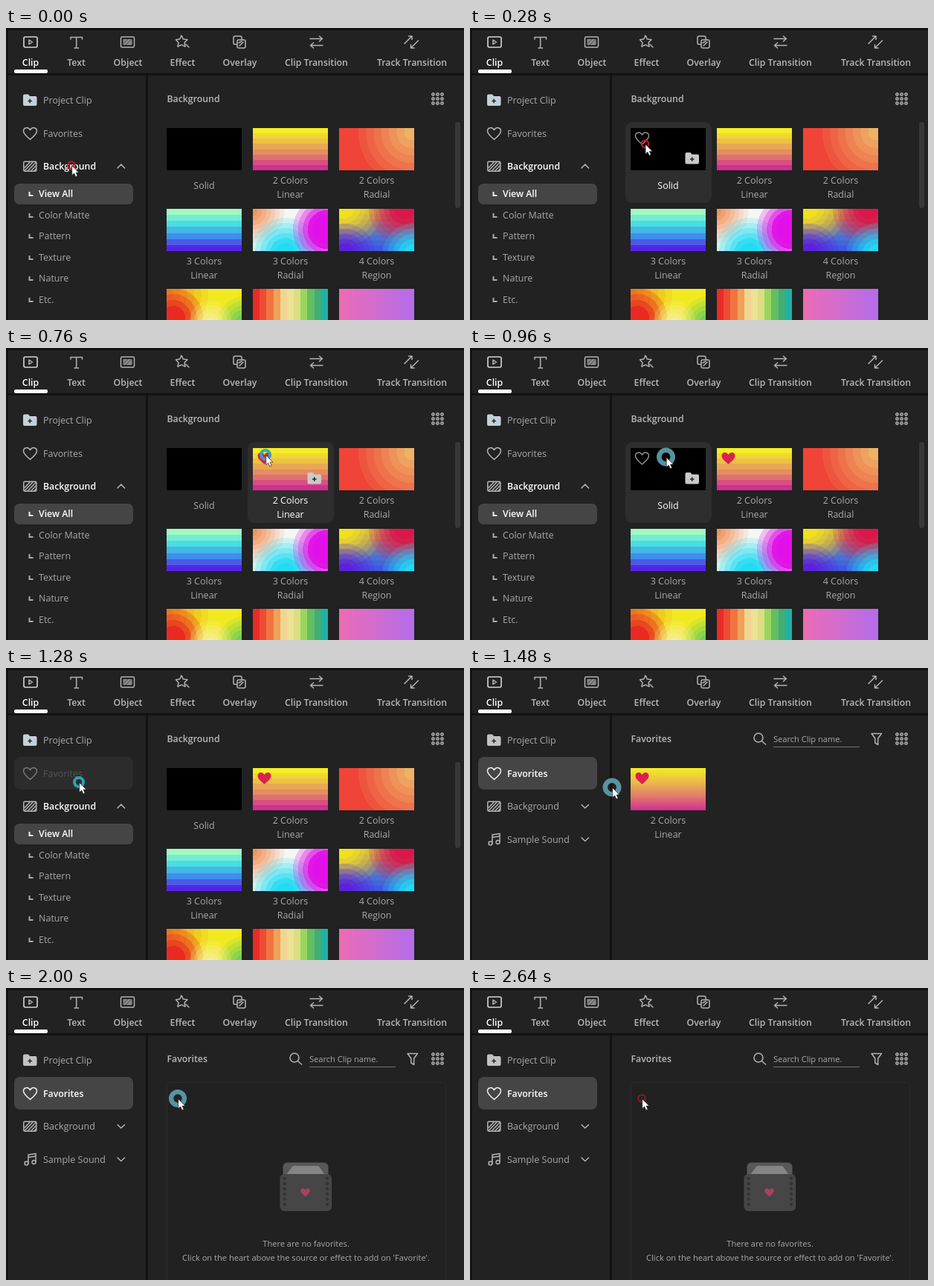
An HTML page for the animation above (2.68 s loop, 616 by 394 pixels).

```html
<!DOCTYPE html>
<html lang="en">
<head>
<meta charset="utf-8">
<title>Favorites</title>
<style>
  html, body { margin: 0; width: 100%; height: 100%; overflow: hidden; background: #222; }
  svg { display: block; width: 616px; height: 394px; font: 12.5px "Open Sans", "Noto Sans", sans-serif; }
  text { fill: #a9a9a9; }
  .b { font-weight: 600; font-size: 12.3px; fill: #b9b9b9; }
  .w, .hot text { fill: #fff; }
  .s { font-size: 11.1px; }
  .m { text-anchor: middle; }
  .i { fill: none; stroke: #b4b4b4; stroke-width: 1.5; stroke-linecap: round; stroke-linejoin: round; }
  .dim { stroke: #8c8c8c; }
  .crisp { shape-rendering: crispEdges; }
</style>
</head>
<body>
<svg id="stage" viewBox="0 0 616 394"></svg>
<script>
const LOOP = 2680, STEP = 40;
const HEART = 'M0 8C-4 4-9 1-9-3.4C-9-8.6-2.5-9.6 0-4.8C2.5-9.6 9-8.6 9-3.4C9 1 4 4 0 8z';

// Pointer path: time, x, y
const PATH = [
  [0, 88, 185], [80, 92, 184], [200, 170, 167], [320, 268, 151], [440, 324, 145],
  [560, 345, 143], [640, 349, 144], [840, 349, 144], [1000, 235, 148], [1120, 128, 153],
  [1200, 98, 154], [1300, 98, 154], [1400, 138, 161], [1480, 191, 161], [1600, 231, 149], [LOOP, 231, 149]
];
const CLICKS = [720, 1240, 1780];
const LIKED = 740, OPENED = 1360, EMPTIED = 1840;

const text = (x, y, s, c = '', more = '') => `<text x="${x}" y="${y}" class="${c}" ${more}>${s}</text>`;
const path = (d, c = 'i', more = '') => `<path d="${d}" class="${c}" ${more}/>`;
const rect = (x, y, w, h, fill, r = 0, more = '') =>
  `<rect x="${x}" y="${y}" width="${w}" height="${h}" rx="${r}" fill="${fill}" ${more}/>`;
const box = (x, y, w, h, fill, r) => rect(x, y, w, h, fill, r, 'stroke="#b4b4b4" stroke-width="1.5"');
const group = (id, body, more = '') => `<g id="${id}" ${more}>${body}</g>`;
const at = (x, y, body, c = '') => `<g transform="translate(${x} ${y})" class="${c}">${body}</g>`;
const times = (n, f) => Array.from({ length: n }, (_, i) => f(i)).join('');
const heart = (x, y, c, more = '') => at(x, y, path(HEART, c, more));
const redHeart = (x, y, id) => heart(x, y, '', `id="${id}" fill="#dc1f50"`);

const rgb = h => [1, 3, 5].map(i => parseInt(h.slice(i, i + 2), 16));
function mix(colors, p) {
  const q = p * (colors.length - 1), k = Math.min(colors.length - 2, Math.floor(q));
  const a = rgb(colors[k]), b = rgb(colors[k + 1]);
  return `rgb(${a.map((v, i) => Math.round(v + (b[i] - v) * (q - k)))})`;
}

const W = 101, H = 57;
const bandsY = (colors, n) => times(n, i => rect(0, i * H / n, W, H / n, mix(colors, i / (n - 1))));
const bandsX = (colors, n) => times(n, i => rect(i * W / n, 0, W / n, H, mix(colors, i / (n - 1))));
// A colour that fades outwards in visible rings
let blobs = 0;
function blob(color, x, y, r, n, solid = 1) {
  const id = 'blob' + blobs++;
  const stop = (k, o) => `<stop offset="${k / n}" stop-color="${color}" stop-opacity="${o}"/>`;
  const stops = times(n, i => {
    const o = Math.min(1, solid * (1 - i / n));
    return stop(i, o) + stop(i + 1, o);
  });
  return `<radialGradient id="${id}" gradientUnits="userSpaceOnUse" cx="${x}" cy="${y}" r="${r}">${stops}${stop(n, 0)}</radialGradient>`
    + rect(0, 0, W, H, `url(#${id})`);
}

const SUNSET = ['#f4ee22', '#ecb94a', '#e27b6c', '#d22e94'];
const thumbs = [
  rect(0, 0, W, H, '#000'),
  bandsY(SUNSET, 8),
  rect(0, 0, W, H, '#ef4437') + blob('#eeb268', 98, 6, 72, 7),
  bandsY(['#a2f8c2', '#48dfe2', '#3f8fee', '#5524e6'], 7),
  rect(0, 0, W, H, '#f5f7f4') + blob('#f0925c', 0, 4, 42, 7) + blob('#22dcf2', 44, 60, 48, 7, 1.3)
    + blob('#e010e6', 100, 28, 46, 7, 1.7),
  bandsY(['#c89a5c', '#93788c', '#4a74d0', '#4056e0'], 8) + blob('#f0e020', 6, -2, 52, 7, 1.2)
    + blob('#d8184c', 88, 0, 48, 7, 1.3) + blob('#5a22dc', 8, 60, 40, 6, 1.2) + blob('#22d8f4', 100, 62, 42, 6, 1.3),
  rect(0, 0, W, H, '#f2ea20') + blob('#5cc860', 104, 46, 36, 6) + blob('#f09020', 0, 8, 56, 6)
    + blob('#e82a20', 9, 39, 40, 5, 1.3) + blob('#f6ee9a', 59, 44, 28, 5),
  bandsX(['#e82c26', '#ee5a36', '#f09a50', '#f0e4a0', '#eee08c', '#90d45c', '#48b064', '#22b0a4'], 11),
  bandsX(['#ea6cb6', '#d06cd0', '#b66ce8'], 10)
];
const names = [['Solid'], ['2 Colors', 'Linear'], ['2 Colors', 'Radial'],
  ['3 Colors', 'Linear'], ['3 Colors', 'Radial'], ['4 Colors', 'Region']];

const label = (x, y, lines) => lines.map((s, k) =>
  text(x + 50.5, y + (lines.length > 1 ? 75 + 19 * k : 82), s, 'm')).join('');
const folder = (x, y, fill) => at(x, y,
  `<path d="M0 2Q0 0 2 0H7L9 2.5H16.500Q18.500 2.500 18.500 4.500V13.500Q18.500 15.500 16.500 15.500H2Q0 15.500 0 13.500z" fill="${fill}"/>`
  + path('M9.200 6.200V11.800M6.400 9H12', '', 'stroke="#2a2a2a" stroke-width="1.700"'));
const hatch = (x, y) => at(x, y, box(.8, .8, 17, 13, 'none', 1.5)
  + path('M2 9L9 1.500M2 13L13 1.500M6 13.500L17 2M10.500 13.500L17.500 6M15 13.500L17.500 10.500'));

function card(i) {
  const x = 216 + 116 * (i % 3), y = [135, 244, 352][Math.floor(i / 3)];
  const hover = i < 2;
  return group('card' + i,
    (hover ? rect(x - 7, y - 8, 116, 109, '#2e2e2e', 9, `id="pane${i}"`) : '')
    + at(x, y, thumbs[i], 'crisp') + (names[i] ? label(x, y, names[i]) : '')
    + (hover ? group('tools' + i, heart(x + 15.500, 149, 'i dim', `id="outline${i}"`) + folder(x + 73.5, 168, '#cacaca')) : ''));
}

const tabs = [[33, 'Clip'], [94.5, 'Text'], [164, 'Object'], [237.5, 'Effect'], [314.5, 'Overlay'],
  [417.5, 'Clip Transition'], [546, 'Track Transition']];
const topBar =
  tabs.map(([x, s], i) => text(x, 50.5, s, i ? 'b m' : 'b m w')).join('')
  + rect(11, 56, 45, 5, '#fff', 2)
  + rect(24, 12, 18, 14, 'none', 2, 'stroke="#d8d8d8" stroke-width="1.6"') + path('M31 16V22L35.500 19z', 'i')
  + path('M87 15V12.500H102.500V15M94.700 12.500V27M92 27H97.500')
  + box(154.500, 12, 18, 14, 'none', 2)
  + rect(157.500, 15, 12, 8, '#8a8a8a', 1) + path('M158 21L164 15M161 23L168.500 15.500', '', 'stroke="#444"')
  + path('M236 10L238.400 15L244 15.800L240 19.700L241 25.200L236 22.600L231 25.200L232 19.700L228.500 15.800L233.700 15z')
  + path('M242 22L246 26')
  + box(306, 11, 11, 11, 'none', 2) + box(311, 16, 11, 11, '#222', 2) + path('M313 20L317 18M314 24L319 19')
  + path('M409 14.500H425M421.500 11L425.500 14.500L421.500 18M426 23.500H410M413.500 20L409.500 23.500L413.500 27')
  + path('M536 21L546 11M541.500 11H546V15.500M554.500 17L544.500 27M549 27H544.500V22.500');

const subs = ['View All', 'Color Matte', 'Pattern', 'Texture', 'Nature', 'Etc.'];
const tree = text(50, 191, 'Background', 'b w') + path('M150 189L154.800 184L159.600 189')
  + rect(11, 210, 160, 28, '#454545', 7)
  + subs.map((s, i) => {
    const y = Math.round(228 + 28.6 * i);
    return path(`M31.500 ${y - 7}V${y - 2}H36.500`, '', `fill="none" stroke="${i ? '#aaa' : '#eee'}" stroke-width="2"`)
      + text(44, y, s, i ? '' : 'b w');
  }).join('');
const flat = text(50, 191, 'Background') + text(50, 236, 'Sample Sound')
  + path('M150 184.500L154.800 189L159.600 184.500M150 229L154.800 233.500L159.600 229')
  + path('M30 236V225L40 223.500V234.500M30 228.500L40 227')
  + '<circle cx="27.500" cy="236.500" r="2.500" class="i"/><circle cx="37.500" cy="235" r="2.500" class="i"/>';
const side = rect(11, 120, 160, 44, '#454545', 8, 'id="row"')
  + group('blueFolder', folder(23, 89.500, '#c2d2dc')) + group('grayFolder', folder(23, 89.500, '#c2c2c2'))
  + text(50, 102, 'Project Clip') + heart(32.5, 142.500, 'i', 'id="favIcon"')
  + text(50, 147, 'Favorites', '', 'id="favText"')
  + hatch(23, 179.500) + group('tree', tree) + group('flat', flat);

const dots = times(9, i =>
  `<circle cx="${574.500 + 6 * (i % 3)}" cy="${89.500 + 6 * Math.floor(i / 3)}" r="2" fill="#7c7c7c" stroke="#b4b4b4"/>`);

const gridView = text(216.500, 100, 'Background', 'b') + times(9, card) + redHeart(347.500, 149, 'liked')
  + rect(604, 127, 7, 116, '#383838', 3);

const search = '<circle cx="388" cy="94" r="6" class="i"/>' + path('M392.500 98.500L397.500 103')
  + text(408, 100, 'Search Clip name.', 's') + rect(408, 106, 116, 1, '#777')
  + path('M540 88.500H553.500L548.700 95V103.500L544.800 101V95z');
const single = rect(209, 127, 116, 109, '#2e2e2e', 9, 'id="favPane"')
  + `<linearGradient id="sunset" x2="0" y2="1">${SUNSET.map((c, i) => `<stop offset="${i / 3}" stop-color="${c}"/>`).join('')}</linearGradient>`
  + rect(216, 135, W, H, 'url(#sunset)') + label(216, 135, names[1])
  + group('favTools', folder(289.5, 168, '#cacaca')) + redHeart(231.5, 149, 'favHeart');
const holes = times(6, i => rect(372.500, 255 + 7 * i, 4, 4, '#333', 1) + rect(430, 255 + 7 * i, 4, 4, '#333', 1));
const empty = rect(216.500, 127.500, 375, 300, '#212121', 6, 'stroke="#2c2c2c"')
  + rect(372.500, 235.500, 61, 40, '#585858', 6) + path('M377 252L385 241Q386 240 388 240H418Q420 240 421 241L429 252z', '', 'fill="#858585"')
  + rect(368.500, 251, 69.500, 50, '#464646', 6) + holes
  + at(402.500, 276, `<path d="${HEART}" transform="scale(.7)" fill="#ac4059"/>`)
  + text(403.500, 349, 'There are no favorites.', 's m')
  + text(403.500, 368, "Click on the heart above the source or effect to add on 'Favorite'.", 's m');
const favView = text(216.500, 100, 'Favorites', 'b') + search + group('single', single) + group('empty', empty);

const pointer = group('red', '<circle r="4.800" fill="none" stroke="#d0142a" stroke-width="2"/>')
  + '<circle id="ring" fill="none"/>'
  + at(.7, .7, path('M0 0V13L3 10.300L5 15L7.400 14L5.400 9.400H9.300z', '', 'fill="#fff" stroke="#222" stroke-width=".7"'));

stage.innerHTML = rect(0, 0, 616, 394, '#222') + group('grid', gridView) + group('fav', favView) + dots
  + rect(0, 61, 616, 3, '#121212') + rect(188, 64, 3, 330, '#121212')
  + rect(0, 0, 616, 3, '#141414') + rect(0, 0, 2.5, 394, '#111') + topBar + side + group('pointer', pointer);

const el = id => document.getElementById(id);
const show = (id, on) => el(id).style.display = on ? '' : 'none';
const clamp = v => Math.max(0, Math.min(1, v));

function pointerAt(t) {
  const k = PATH.findIndex((p, i) => i && t <= p[0]);
  const a = PATH[k - 1], b = PATH[k], p = (t - a[0]) / (b[0] - a[0]);
  return [a[1] + (b[1] - a[1]) * p, a[2] + (b[2] - a[2]) * p];
}

function draw(t) {
  const [x, y] = pointerAt(t);
  const inside = (l, top, r, bottom) => x >= l && x < r && y >= top && y < bottom;
  const open = t >= OPENED, gone = t >= EMPTIED, liked = t >= LIKED;

  for (const [id, on] of [['grid', !open], ['tree', !open], ['blueFolder', !open], ['fav', open], ['flat', open],
    ['grayFolder', open], ['single', !gone], ['empty', gone], ['liked', liked]]) show(id, on);

  [0, 1].forEach(i => {
    const hot = inside(209 + 116 * i, 127, 325 + 116 * i, 236);
    show('pane' + i, hot);
    show('tools' + i, hot);
    el('card' + i).setAttribute('class', hot ? 'hot' : '');
  });
  show('outline1', !liked);
  const favHot = inside(209, 127, 325, 236);
  show('favPane', favHot);
  show('favTools', favHot);
  el('single').setAttribute('class', favHot ? 'hot' : '');

  const over = inside(11, 120, 171, 164), pressed = !open && over && t >= CLICKS[1];
  show('row', open || over);
  el('row').setAttribute('fill', open ? '#454545' : '#2c2c2c');
  el('favText').setAttribute('class', open ? 'b w' : '');
  el('favText').style.fill = pressed ? '#555' : '';
  el('favIcon').style.stroke = open ? '#f0f0f0' : pressed ? '#777' : '';

  // Click ring widens, then fades
  const age = t - Math.max(-1e4, ...CLICKS.filter(c => c <= t));
  const grow = clamp((age - 40) / 200), live = age < 420;
  const ring = el('ring');
  show('ring', live);
  ring.setAttribute('r', 6 + 3.2 * grow);
  ring.setAttribute('stroke-width', 4 + 2.6 * grow);
  ring.setAttribute('stroke', mix(['#2aa8bc', '#5c9aa8'], grow));
  ring.style.opacity = .95 * (1 - clamp((age - 260) / 160));
  show('red', !live);
  el('red').style.opacity = t < CLICKS[0] ? 1 : .6;
  el('pointer').setAttribute('transform', `translate(${x} ${y})`);
}

const start = performance.now();
function tick() {
  const t = (performance.now() - start) % LOOP;
  draw(Math.floor((t + 1) / STEP) * STEP % LOOP);
  requestAnimationFrame(tick);
}
tick();
</script>
</body>
</html>
```
